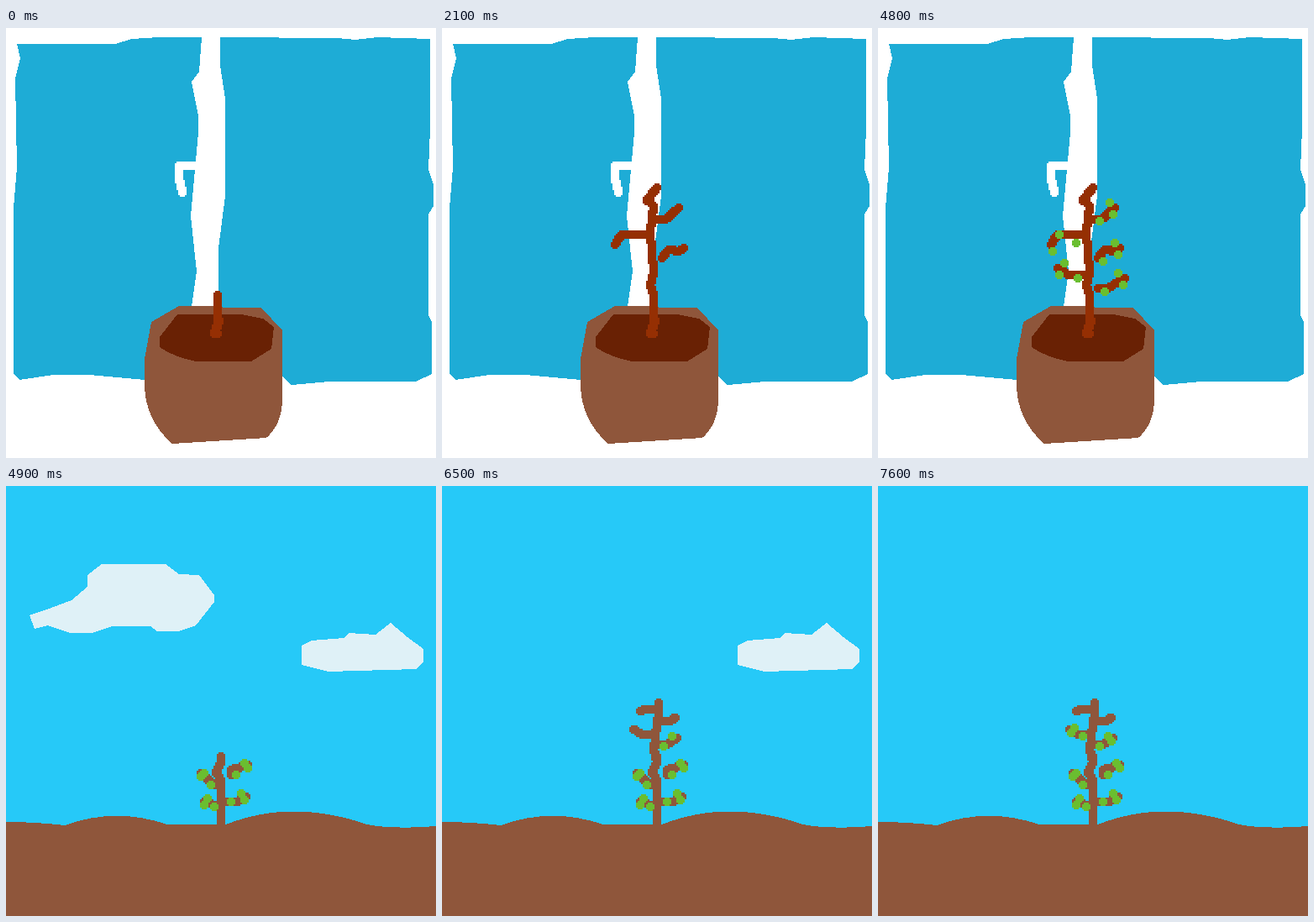
Animation of 512x512 px, one loop 8 s. Source, as an HTML page:

```html
<!DOCTYPE html>
<html lang="en">
<head>
<meta charset="utf-8">
<title>Growing tree</title>
<style>
  html, body { margin: 0; width: 100%; height: 100%; overflow: hidden; background: #fff; }
  svg { display: block; width: 100%; height: 100%; shape-rendering: crispEdges; }
  .glass { fill: #1eacd6; }
  .sky { fill: #26c9f8; }
  .soil { fill: #692104; }
  .bark { fill: #952f03; }
  .earth { fill: #8f563b; }
  .cloud { fill: #dff1f7; }
  .handle { fill: #fff; }
  .leaf { fill: #6abe30; }
</style>
</head>
<body>
<svg viewBox="0 0 512 512">
  <g data-show="0-4900" data-spread="1">
    <path class="glass" d="M13 19H130L150 13 182 11H233L230 52 221 64 229 104V124L220 224 227 290 221 332V419H165L100 413H56L16 419 9 411V214L13 166 11 60 17 36Z"/>
    <path class="glass" d="M255 11L394 12 416 14 442 11 505 13V120L503 168 509 186V212L503 222V342L507 350V412L488 421H384L340 425 253 340V262L261 200V84L255 45Z"/>
    <path class="handle brush" d="M228 164H206V178L210 196"/>
    <path class="earth" d="M206 331H256L258 333H304L329 360V444Q328 472 310 488L198 495Q167 468 165 428V394L173 350Z"/>
    <path class="soil" d="M204 341H280L306 346 319 356 316 382 292 397H226Q198 391 183 380V368Z"/>

    <path class="bark brush" d="M252 318V344L254 348 248 364H252"/>
    <path class="bark brush" data-show="600" d="M252 318L248 308 252 290"/>
    <path class="bark brush" data-show="800" d="M252 290L248 244"/>
    <path class="bark brush" data-show="900" d="M248 244L252 212 244 205 256 190"/>
    <path class="bark brush" data-show="1200" data-bloom="4533" d="M258 228H266L282 214"/>
    <path class="bark brush" data-show="1300" data-bloom="4133" d="M246 246H214L206 258"/>
    <path class="bark brush" data-show="2100" data-bloom="3733" d="M262 274L270 264 282 266 288 262"/>
    <path class="bark brush" data-show="2300" data-bloom="3333" d="M246 294L226 293 214 286"/>
    <path class="bark brush" data-show="2400" data-bloom="2667" d="M262 310H272L294 298"/>
  </g>

  <g data-show="4900" data-spread="0.5">
    <path class="sky" d="M0 0H512V512H0Z"/>
    <path class="earth" d="M0 400Q36 400 70 404Q130 382 192 403H262Q340 372 430 403Q460 409 512 405V512H0Z"/>
    <path class="cloud" data-show="4900-5200 6400-6500 7300-7500" d="M114 93H190L206 105 230 106 248 130V138L226 166 206 173H180L172 167H126L102 175H76L50 166 34 170 28 154 54 145 78 136 97 120V106Z"/>
    <path class="cloud" id="smallCloud" data-show="4900-5200 6400-7400" d="M352 190L364 184 402 181 408 175 440 177 458 163 478 180 497 194V210L488 218 384 221 352 213Z"/>
    <g data-show="5200-5800 7500-7600">
      <path class="cloud" transform="translate(60 -44)" d="" id="edgeCloud"/>
    </g>

    <path class="earth brush" d="M255 321L256 330 250 340 255 350V402"/>
    <path class="earth brush" data-bloom="0" d="M268 344V338L288 332"/>
    <path class="earth brush" data-bloom="0" d="M248 356L232 342"/>
    <path class="earth brush" data-bloom="0" d="M262 375H276L286 370"/>
    <path class="earth brush" data-bloom="0" d="M252 379H246L235 375"/>
    <path class="earth brush" data-show="5000" d="M257 258V276L252 314 255 324"/>
    <path class="earth brush" data-show="5200" data-bloom="6400" d="M258 308H266L280 300"/>
    <path class="earth brush" data-show="5800" data-bloom="7333" d="M250 296H238L228 290"/>
    <path class="earth brush" data-show="6200" d="M264 280H272L278 276"/>
    <path class="earth brush" data-show="6400" d="M254 266H242L235 268"/>
  </g>
</svg>
<script>
const LOOP = 8000, BEAT = 400 / 3, TICK = 100, PIXEL = 2;
const all = selector => document.querySelectorAll(selector);
const snap = value => Math.round(value / PIXEL) * PIXEL;

// One dab of the blocky round brush
const dab = (x, y) => `M${snap(x) - 3} ${snap(y) - 5}h6v2h2v6h-2v2h-6v-2h-2v-6h2z`;

// Each branch bears a leaf below its root, one above its tip and one under the tip
const leafSpots = [[0.25, 6], [0.75, -9], [0.95, 8]];

function addLeaves(branch, root, tip) {
  const tree = branch.parentNode;
  leafSpots.forEach(([along, drop], i) => {
    const x = root.x + (tip.x - root.x) * along;
    const y = root.y + (tip.y - root.y) * along + drop * tree.dataset.spread;
    const leaf = branch.cloneNode();
    leaf.setAttribute('class', 'leaf');
    leaf.setAttribute('d', dab(x, y));
    leaf.dataset.show = Math.floor((+branch.dataset.bloom + i * BEAT) / TICK) * TICK;
    tree.append(leaf);
  });
}

function paint(line) {
  const length = line.getTotalLength();
  const root = line.getPointAtLength(0), tip = line.getPointAtLength(length);
  let dabs = dab(tip.x, tip.y);
  for (let at = 0; at < length; at += PIXEL) {
    const { x, y } = line.getPointAtLength(at);
    dabs += dab(x, y);
  }
  line.setAttribute('d', dabs);
  if (line.dataset.bloom) addLeaves(line, root, tip);
}

all('.brush').forEach(paint);
document.getElementById('edgeCloud').setAttribute(
  'd', document.getElementById('smallCloud').getAttribute('d'));

const timed = [...all('[data-show]')].map(node => ({
  node,
  spans: node.dataset.show.split(' ').map(span => {
    const [from, to = LOOP] = span.split('-').map(Number);
    return { from, to };
  })
}));

const start = performance.now();
function draw(now) {
  const time = Math.max(0, now - start) % LOOP;
  for (const { node, spans } of timed) {
    const visible = spans.some(({ from, to }) => time >= from && time < to);
    node.style.display = visible ? '' : 'none';
  }
  requestAnimationFrame(draw);
}
draw(start);
</script>
</body>
</html>
```
